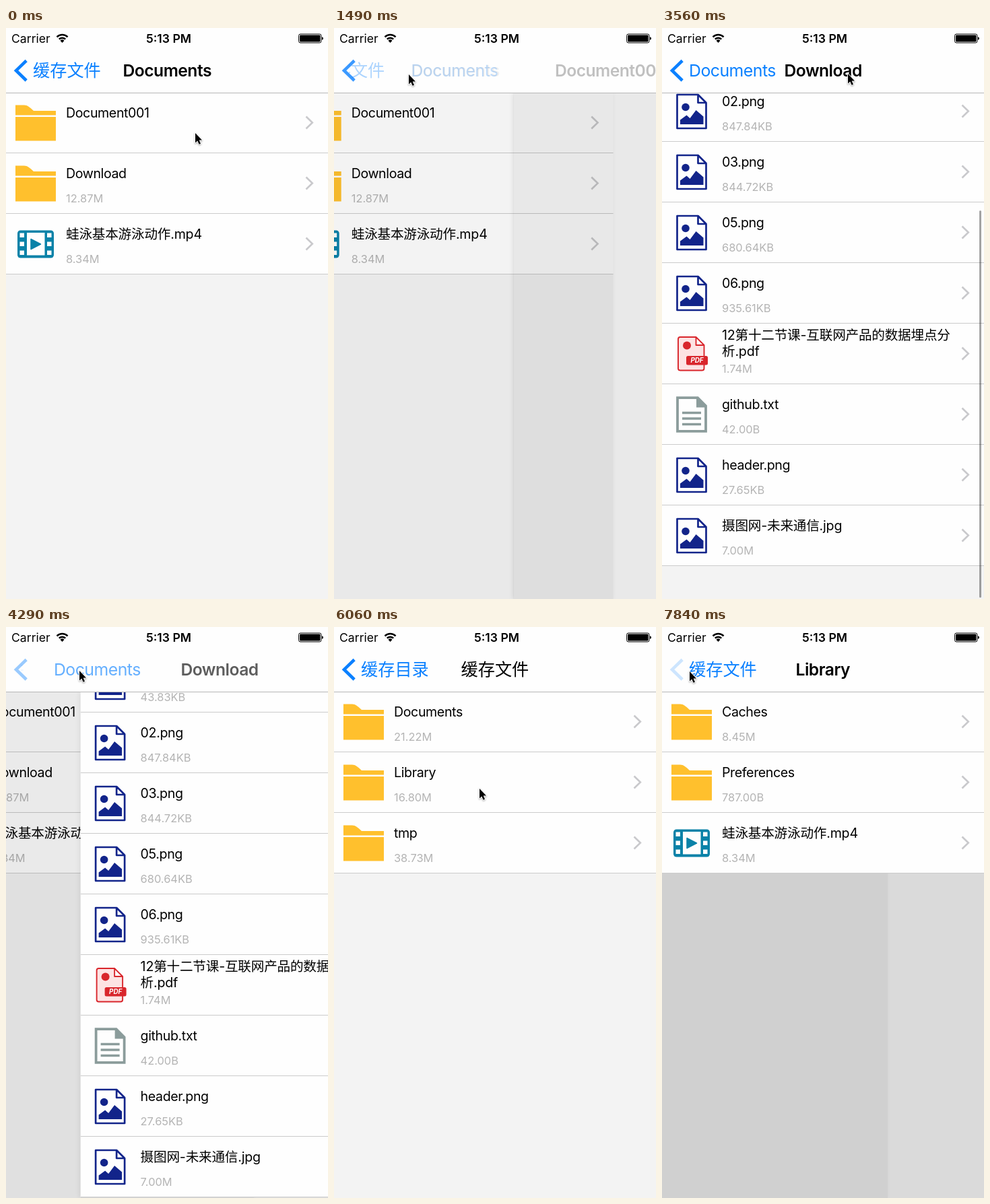
These frames come from a looping animation (478 px wide and 848 px high, 7990 ms). An HTML page:

```html
<!DOCTYPE html>
<html lang="zh-CN">
<head>
<meta charset="utf-8">
<title>File browser</title>
<style>
html, body { margin: 0; width: 100%; height: 100%; overflow: hidden; background: #fff; }
#stage {
  position: relative; width: 478px; height: 848px; overflow: hidden; background: #fff;
  font-family: Inter, "Noto Sans CJK SC", "Noto Sans CJK", sans-serif; color: #000; white-space: nowrap;
}
#stage svg { position: absolute; left: 0; top: 0; overflow: visible; }
#view { position: absolute; left: 0; top: 97px; width: 478px; height: 751px; overflow: hidden; }
.page {
  position: absolute; inset: 0; background: rgba(0, 0, 0, .047); box-shadow: -2px 0 7px rgba(0, 0, 0, .09);
}
.page::before {
  content: ""; position: absolute; left: -478px; width: 956px; height: 751px;
  background: rgba(0, 0, 0, var(--dim, 0));
}
.list { position: absolute; left: 0; top: -1px; width: 478px; }
.row { position: relative; height: 90px; background: #fefefe; overflow: hidden; }
.row::after { content: ""; position: absolute; left: 0; bottom: 0; width: 100%; height: 1px; background: #cbcbcb; }
.row.on { background: #d9d9d9; }
.name, .size { position: absolute; left: 89px; }
.name { top: 18px; font-size: 19.6px; line-height: 24px; letter-spacing: -.02em; }
.name.cjk { letter-spacing: -.01em; }
.name.two { top: 6px; line-height: 23.5px; }
.size { top: 57px; font-size: 16.4px; line-height: 20px; color: #b4b4b4; }
#bar { position: absolute; left: 471px; width: 3px; border-radius: 2px; background: rgba(0, 0, 0, .36); }
#nav { position: absolute; left: 0; top: 0; width: 478px; height: 96px; background: #fefefe; border-bottom: 1px solid #b7b7b7; overflow: hidden; }
#labels { position: absolute; left: 22px; top: 40px; width: 456px; height: 56px; overflow: hidden; }
.title, .label { position: absolute; line-height: 32px; letter-spacing: -.02em; }
.title { top: 47px; font-size: 24.6px; font-weight: 600; }
.label { left: 18px; top: 7px; font-size: 24.8px; color: #0a80ff; }
.title.cjk, .label.cjk { font-size: 25.2px; letter-spacing: 0; }
.title.cjk { font-weight: 500; }
.status { position: absolute; top: 6px; line-height: 20px; font-size: 17.6px; }
#clock { left: 0; width: 483px; text-align: center; font-weight: 600; }
</style>
</head>
<body>
<div id="stage">
  <svg width="0" height="0">
    <defs>
      <symbol id="folder" overflow="visible">
        <path fill="#ffc02d" d="M14 18.5h13c5 0 8 3 14 8.500h33v6.500H14zM14 36h60v35.500H14z"/>
      </symbol>
      <symbol id="film" overflow="visible">
        <rect x="17" y="24.500" width="54" height="41" rx="4.500" fill="#0a82a8"/>
        <path fill="#fefefe" d="M31 28h26.500v33.500H31zM20.500 28.500h6.500v6.500h-6.500zM20.500 41.500h6.500v6.500h-6.500zM20.500 54.500h6.500v6.500h-6.500zM61 28.500h6.500v6.500H61zM61 41.500h6.500v6.500H61zM61 54.500h6.500v6.500H61z"/>
        <path fill="#0a82a8" stroke="#0a82a8" stroke-width="1.500" stroke-linejoin="round" d="M37 37.500v15l14.500-7.500z"/>
      </symbol>
      <symbol id="image" overflow="visible">
        <path fill="none" stroke="#12248a" stroke-width="2.700" stroke-linejoin="round" d="M22.500 20H53.500L65.500 32V70H22.500ZM53.500 20V32H65.500"/>
        <circle cx="35" cy="38.500" r="5.800" fill="#12248a"/>
        <path fill="#12248a" d="M27 64V57.500L36.500 50.500 41.500 55 50.500 43 61.500 52.500V64z"/>
      </symbol>
      <symbol id="pdf" overflow="visible">
        <path fill="#fde3e3" stroke="#d9262c" stroke-width="1.900" stroke-linejoin="round" d="M27 20H50.500L62.500 32V66.500a3 3 0 0 1-3 3H27a3 3 0 0 1-3-3V23a3 3 0 0 1 3-3ZM50.500 20V32H62.500"/>
        <circle cx="37" cy="32.500" r="6" fill="#d9262c"/>
        <rect x="36" y="48" width="32" height="13.500" rx="2.500" fill="#d9262c"/>
        <text x="52" y="58.300" text-anchor="middle" font-size="9.800" font-weight="700" font-style="italic" fill="#fff">PDF</text>
      </symbol>
      <symbol id="text" overflow="visible">
        <path fill="none" stroke="#8b9c9b" stroke-width="3.800" d="M23 20.200H53L65 32.200V69.800H23Z"/>
        <path fill="#8b9c9b" d="M51 19L66.500 34.500H51z"/>
        <path stroke="#8b9c9b" stroke-width="3.600" d="M30 42.500h28M30 51h28M30 59.500h28"/>
      </symbol>
    </defs>
  </svg>
  <div id="view"><div id="bar"></div></div>
  <div id="nav">
    <span class="status" style="left:8px">Carrier</span>
    <span class="status" id="clock">5:13 PM</span>
    <div id="labels"></div>
    <svg width="478" height="96">
      <g fill="none" stroke="#000" stroke-width="2.500">
        <path d="M75.500 13.300a11.500 11.500 0 0 1 16 0M78.800 16.700a6.800 6.800 0 0 1 9.400 0"/>
        <path d="M83.500 22l-3-3.200a4.300 4.300 0 0 1 6 0z" fill="#000" stroke="none"/>
        <rect x="434.500" y="9" width="33.500" height="13" rx="2.500" stroke-width="1"/>
      </g>
      <rect x="436" y="10.500" width="30.500" height="10" rx="1"/>
      <path d="M469 13.200q2 .5 2 2.300t-2 2.300z"/>
      <path id="back" fill="none" stroke="#0a80ff" stroke-width="4.600" d="M30.200 48.500L15 63.200 30.200 78"/>
    </svg>
  </div>
  <svg id="cursor" width="14" height="20">
    <path d="M0 0V14.500L3.300 11.500 5.600 16.700 8 15.700 5.700 10.600H10Z" stroke="#fff" stroke-width="1.800" stroke-linejoin="round" paint-order="stroke" style="filter:drop-shadow(0 1px 1px rgba(0,0,0,.35))"/>
  </svg>
</div>
<script>
const LOOP = 7990, TICK = 147.6, STEP = 148, W = 478, H = 751, SLIDE = 500;
const $ = id => document.getElementById(id);
const view = $('view'), bar = $('bar');

const kinds = { png: 'image', jpg: 'image', mp4: 'film', pdf: 'pdf', txt: 'text' };
const isCjk = s => /[\u4e00-\u9fff]/.test(s) ? ' cjk' : '';

function rowHtml(entry) {
  const [name, size = ''] = entry.split('|');
  const icon = kinds[name.split('.')[1]] || 'folder';
  const two = name.includes('\n') ? ' two' : '';
  return `<div class="row"><svg width="478" height="90"><use href="#${icon}"/>
    <path d="M445.500 35.500L454.800 44.500 445.500 53.500" fill="none" stroke="#c9c9cc" stroke-width="2.600"/></svg>
    <span class="name${isCjk(name)}${two}">${name.replace('\n', '<br>')}</span><span class="size">${size}</span></div>`;
}

function add(parent, cls, html) {
  const el = document.createElement('div');
  el.className = cls;
  el.innerHTML = html;
  parent.append(el);
  return el;
}

// enter: distance the title travels while sliding in
function makePage(title, back, rows, enter = 320) {
  const el = add(view, 'page', `<div class="list">${rows.map(rowHtml).join('')}</div>`);
  const page = {
    el, enter, list: el.firstChild, rows: el.querySelectorAll('.row'),
    title: add($('nav'), 'title' + isCjk(title), title),
    label: add($('labels'), 'label' + isCjk(back), back)
  };
  page.left = 239 - page.title.offsetWidth / 2;
  page.title.style.left = page.left + 'px';
  return page;
}

const movie = '蛙泳基本游泳动作.mp4|8.34M';
const root = makePage('缓存文件', '缓存目录', ['Documents|21.22M', 'Library|16.80M', 'tmp|38.73M']);
const docs = makePage('Documents', '缓存文件', ['Document001', 'Download|12.87M', movie]);
const empty = makePage('Document001', 'Documents', [], 303);
const down = makePage('Download', 'Documents', [
  '01.png|843.49KB', '01APP性能优化.png|43.83KB', '02.png|847.84KB', '03.png|844.72KB',
  '05.png|680.64KB', '06.png|935.61KB', '12第十二节课-互联网产品的数据埋点分\n析.pdf|1.74M',
  'github.txt|42.00B', 'header.png|27.65KB', '摄图网-未来通信.jpg|7.00M'], 337);
const lib = makePage('Library', '缓存文件', ['Caches|8.45M', 'Preferences|787.00B', movie]);
const pages = [root, docs, empty, down, lib];
view.append(bar);

const slides = [
  { at: 520, under: docs, over: empty, push: true },
  { at: 1361, under: docs, over: empty },
  { at: 2183, under: docs, over: down, push: true },
  { at: 4250, under: docs, over: down },
  { at: 5230, under: root, over: docs },
  { at: 6880, under: root, over: lib, push: true },
  { at: 7844, under: root, over: lib }
];

// [from, until, page, row]
const taps = [[440, 1020, docs, 0], [2060, 2683, docs, 1], [6505, 7380, root, 1]];

const pointer = [[0, 281, 156], [140, 281, 150], [600, 281, 150], [1020, 111, 69], [1500, 111, 69], [1900, 262, 225],
  [2400, 262, 225], [2700, 276, 314], [2800, 276, 314], [3552, 276, 68], [3900, 276, 68], [4100, 109, 65],
  [5400, 109, 65], [5950, 216, 240], [7150, 216, 240], [7600, 41, 66]];
const scrolling = [[2800, 0], [3300, 149], [3552, 197], [3560, 197], [3850, 149]];
const pressing = [[1180, 1], [1184, .2], [1361, .2], [1520, 1], [4140, 1], [4144, .2], [4250, .2], [4410, 1],
  [5030, 1], [5034, .2], [5230, .2], [5390, 1], [7700, 1], [7704, .2]];

function track(keys, t) {
  const i = keys.findIndex(k => k[0] > t);
  if (i === 0) return keys[0].slice(1);
  if (i < 0) return keys[keys.length - 1].slice(1);
  const a = keys[i - 1], b = keys[i], f = (t - a[0]) / (b[0] - a[0]);
  return a.slice(1).map((v, j) => v + (b[j + 1] - v) * f);
}

function put(el, x, alpha = 1) {
  el.style.display = 'block';
  el.style.transform = `translateX(${x}px)`;
  el.style.opacity = alpha;
}

function drawSlide({ at, under, over, push }, t) {
  const u = (t - at) / SLIDE, p = 1 - (1 - u) ** 3;
  const q = push ? 1 - p : p, r = 1 - q;
  const gap = under.left - 40;
  put(under.el, -143 * r);
  put(over.el, W * q);
  over.el.style.setProperty('--dim', .1 * r);
  put(over.title, over.enter * q, r ** 1.75);
  put(under.title, -gap * r, push ? q ** 1.4 : q ** 5);
  put(over.label, gap * q, r ** (push ? 10 : 1.8));
  put(under.label, -148 * r, q ** 1.9);
}

function draw(now) {
  const t = Math.floor(now % LOOP / TICK) * STEP;
  for (const { el, title, label } of pages)
    for (const part of [el, title, label]) part.style.display = 'none';

  const [press] = track(pressing, t);
  const last = slides.filter(s => s.at <= t).pop();
  if (last && t < last.at + SLIDE) drawSlide(last, t);
  else {
    const page = !last ? docs : last.push ? last.over : last.under;
    page.el.style.setProperty('--dim', 0);
    put(page.el, 0);
    put(page.title, 0);
    put(page.label, 0, press);
  }
  $('back').style.opacity = press;

  for (const page of [root, docs]) page.rows.forEach((row, i) =>
    row.classList.toggle('on', taps.some(([a, b, p, n]) => p === page && n === i && t >= a && t < b)));

  const [y] = track(scrolling, t);
  const size = H * H / 900 - Math.max(0, y - 149) - 4;
  down.list.style.transform = `translateY(${-y}px)`;
  bar.style.display = t > 2800 && t < 4050 ? 'block' : 'none';
  bar.style.height = size + 'px';
  bar.style.top = Math.min(y / 149, 1) * (H - 2 - size) + 'px';

  const [cx, cy] = track(pointer, t);
  $('cursor').style.transform = `translate(${cx}px, ${cy}px)`;
}

const start = performance.now();
(function loop() {
  draw(performance.now() - start);
  requestAnimationFrame(loop);
})();
</script>
</body>
</html>
```
